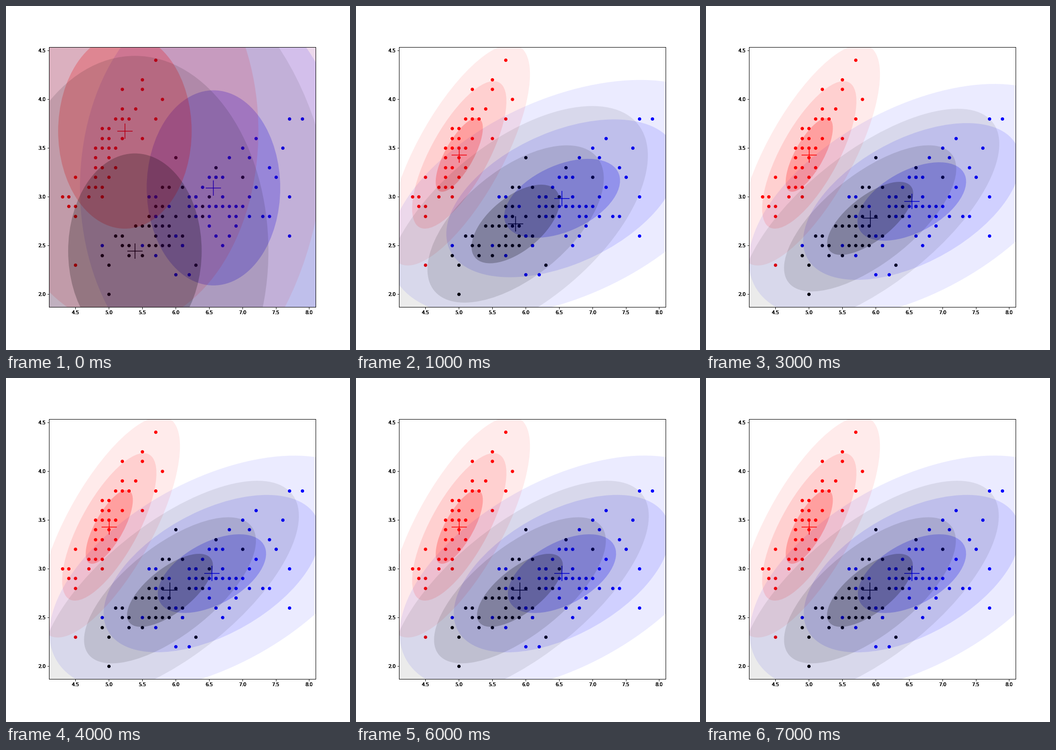
Animation of 720x720 px, one loop 8000 ms. Source, as a matplotlib script:

```python
import numpy as np
import matplotlib.pyplot as plt
from matplotlib.animation import FuncAnimation
from matplotlib.patches import Ellipse

rng = np.random.default_rng(4)

# Each fit: mean x, mean y, semi-axes at one sigma, tilt in degrees
COLORS = ("blue", "red", "black")
RED_FIT = (5.006, 3.428, 0.481, 0.190, 47.65)
START = [(x, y, 1, 1, 0) for x, y in ((6.567, 3.09), (5.24, 3.672), (5.39, 2.443))]
FIRST = [(6.547, 2.983, 0.890, 0.352, 14.1), RED_FIT, (5.85, 2.72, 0.711, 0.305, 24.2)]
SECOND = [(6.53, 2.957, 0.855, 0.330, 15.9), RED_FIT, (5.93, 2.775, 0.708, 0.252, 24.8)]
FINAL = [(6.5446, 2.949, 0.841, 0.335, 16.94), RED_FIT, (5.915, 2.778, 0.700, 0.253, 25.0)]

# Outermost samples of each cluster
OUTER = {
    "red": [(5.7, 4.4), (5.5, 4.2), (5.2, 4.1), (5.8, 4.0), (5.7, 3.8),
            (4.3, 3.0), (4.4, 2.9), (4.5, 2.3)],
    "black": [(6.0, 3.4), (7.0, 3.2), (6.3, 2.3), (4.9, 2.4), (5.0, 2.3), (5.0, 2.0)],
    "blue": [(7.7, 3.8), (7.9, 3.8), (7.2, 3.6), (7.7, 3.0), (7.4, 2.8), (7.7, 2.6),
             (6.7, 2.5), (4.9, 2.5), (6.0, 2.2), (6.2, 2.2)],
}


def samples(fit, spread, count=46, reach=1.9):
    """Normal cloud around a fit, cut at reach and rounded to tenths."""
    x, y, a, b, tilt = fit
    z = rng.normal(size=(4 * count, 2))
    z = z[np.hypot(*z.T) < reach][:count] * spread * np.array([a, b])
    t = np.radians(tilt)
    turn = np.array([[np.cos(t), np.sin(t)], [-np.sin(t), np.cos(t)]])
    return np.round(z @ turn + (x, y), 1)


def fits_at(step):
    """Cluster fits of one iteration, settling from SECOND to FINAL."""
    if step < 2:
        return (START, FIRST)[step]
    k = 0.2 ** (step - 2)
    return k * np.array(SECOND) + (1 - k) * np.array(FINAL)


fig = plt.figure(figsize=(10, 10), dpi=72, facecolor="white")
RECT = (0.125, 0.125, 0.775, 0.755)
ax = fig.add_axes(RECT)
ax.set_autoscale_on(False)
ax.set_xlim(6.1 - 1.997, 6.1 + 1.997)
ax.set_ylim(3.2 - 1.331, 3.2 + 1.331)

# Stacked frames make the tick labels heavier
for _ in range(4):
    fig.add_axes(RECT, sharex=ax, sharey=ax, facecolor="none")

SPREAD = {"red": 1.0, "black": 0.78, "blue": 0.78}
for color in ("red", "black", "blue"):
    cloud = samples(FINAL[COLORS.index(color)], SPREAD[color])
    dots = np.unique(np.vstack([cloud, OUTER[color]]), axis=0)
    ax.scatter(*dots.T, s=36, c=color, zorder=1)

crosses = [ax.scatter([0], [0], s=1000, c=c, marker="+", zorder=2) for c in COLORS]
rings = [[ax.add_patch(Ellipse((0, 0), 1, 1, fc=c, lw=0, alpha=0.23 / n, zorder=3))
          for n in (1, 2, 3)] for c in COLORS]


def update(step):
    for cross, group, (x, y, a, b, tilt) in zip(crosses, rings, fits_at(step)):
        cross.set_offsets([(x, y)])
        for n, ring in enumerate(group, 1):
            ring.set_center((x, y))
            ring.set_width(2 * n * a)
            ring.set_height(2 * n * b)
            ring.set_angle(tilt)
    return []


anim = FuncAnimation(fig, update, frames=8, interval=1000, repeat=True,
                     repeat_delay=0, init_func=lambda: update(0))
plt.show()
```
